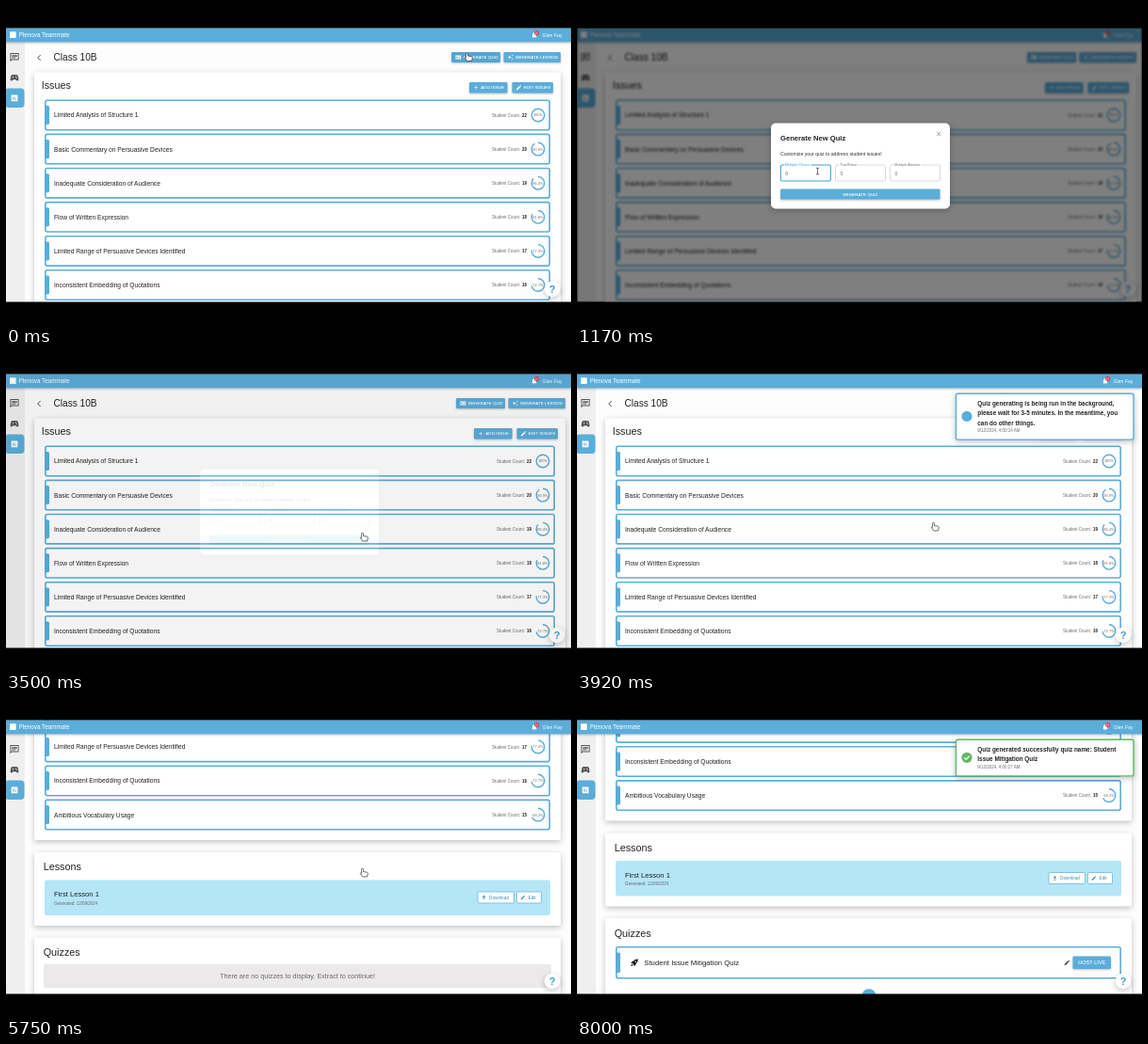
These frames come from a looping animation (600 by 338 pixels, 8.08 s). An HTML page:

```html
<!DOCTYPE html>
<html lang="en">
<head>
<meta charset="utf-8">
<title>Quiz generation walkthrough</title>
<style>
html, body { margin: 0; width: 100%; height: 100%; overflow: hidden; background: #000; }
svg { display: block; width: 100%; height: 100%; font-family: "Liberation Sans", Arial, sans-serif; }
text { white-space: pre; }
.card { filter: drop-shadow(0 2px 3px rgba(0, 0, 0, .24)); }
.lift { filter: drop-shadow(0 1px 1px rgba(0, 0, 0, .25)); }
#blurred { filter: blur(.8px); }
</style>
</head>
<body>
<svg id="stage" viewBox="0 0 600 338"></svg>
<script>
const BLUE = '#5badda', INK = '#222', GREY = '#6b6b6b', GREEN = '#62b866';
const LOOP = 8080, STEP = 1000 / 12;

const ICON = {
  pen: 'M3 17.25V21h3.75L17.81 9.94l-3.75-3.75zM20.71 7.04a1 1 0 0 0 0-1.41l-2.34-2.34a1 1 0 0 0-1.41 0l-1.83 1.83 3.75 3.75z',
  bell: 'M12 22c1.1 0 2-.9 2-2h-4c0 1.1.9 2 2 2zm6-6v-5c0-3-1.6-5.6-4.5-6.3V4a1.5 1.5 0 0 0-3 0v.7C7.6 5.4 6 8 6 11v5l-2 2v1h16v-1z',
  down: 'M5 20h14v-2H5zM19 9h-4V3H9v6H5l7 7z',
  plus: 'M19 13h-6v6h-2v-6H5v-2h6V5h2v6h6z',
  chat: 'M2 2h20v16H6l-4 4zM4 4v13l1-1h15V4zM6 12h8v2H6zM6 9h12v2H6zM6 6h12v2H6z',
  pad: 'M21.6 16.1l-1.1-7.7A4 4 0 0 0 16.5 5h-9a4 4 0 0 0-4 3.4l-1.1 7.7a2.55 2.55 0 0 0 4.3 2.1L9 16h6l2.3 2.2a2.55 2.55 0 0 0 4.3-2.1zM11 11H9v2H8v-2H6v-1h2V8h1v2h2zM14 8h2v2h-2zM16 11h2v2h-2z',
  chart: 'M3 3h18v18H3zM7 10v7h2v-7zM11 7v10h2V7zM15 13v4h2v-4z',
  card: 'M2 5h20v14H2zM5 9v6h5V9zM14 9v2h5V9zM14 13v2h5v-2z',
  spark: 'M9 5l2 5 5 2-5 2-2 5-2-5-5-2 5-2zM19 2l1 3 3 1-3 1-1 3-1-3-3-1 3-1zM19 14l1 3 3 1-3 1-1 3-1-3-3-1 3-1z',
  rocket: 'M22 2c-6 0-10 2-13 6L5 9l-3 4 5 1 3 3 1 5 4-3 1-4c4-3 6-7 6-13zM15 7a2 2 0 1 0 .1 0zM6 16c-3 0-3 3-4 6 3-1 6-1 6-4z'
};

const text = (x, y, size, str, fill = INK, extra = '') =>
  `<text x="${x}" y="${y}" font-size="${size}" fill="${fill}" ${extra}>${str}</text>`;
const rect = (x, y, w, h, fill, extra = '') =>
  `<rect x="${x}" y="${y}" width="${w}" height="${h}" fill="${fill}" ${extra}/>`;
const circle = (x, y, r, fill, extra = '') =>
  `<circle cx="${x}" cy="${y}" r="${r}" fill="${fill}" ${extra}/>`;
const line = (d, stroke, width, extra = '') =>
  `<path d="${d}" fill="none" stroke="${stroke}" stroke-width="${width}" ${extra}/>`;
const icon = (name, x, y, size, fill) =>
  `<path d="${ICON[name]}" fill="${fill}" fill-rule="evenodd" transform="translate(${x - size / 2} ${y - size / 2}) scale(${size / 24})"/>`;
const group = (id, body, extra = '') => `<g id="${id}" ${extra}>${body}</g>`;
const BOLD = 'font-weight="700"', MID = 'text-anchor="middle"', CAPS = 'letter-spacing=".13" stroke="#fff" stroke-width=".08"';

const button = (x, y, w, h, name, tx, label, fill = BLUE) =>
  rect(x, y, w, h, fill, 'rx="1.2" class="lift"') + icon(name, (x + tx) / 2 + 1, y + h / 2, 7, '#fff') +
  text(tx, y + h / 2 + 1.6, 4.4, label, '#fff', CAPS);

const frameRow = (y, h, wide) =>
  rect(41.8, y + .8, 535.4 + wide, h - 1.6, '#fff', `rx="2" stroke="${BLUE}" stroke-width="1.6"`) +
  `<path d="M41 ${y + 6.5}h3.5q1.5 0 1.5 1.5v${h - 16}q0 1.5-1.5 1.5H41z" fill="${BLUE}"/>`;

const issues = [
  ['Limited Analysis of Structure 1', 22], ['Basic Commentary on Persuasive Devices', 20],
  ['Inadequate Consideration of Audience', 19], ['Flow of Written Expression', 18],
  ['Limited Range of Persuasive Devices Identified', 17], ['Inconsistent Embedding of Quotations', 16],
  ['Ambitious Vocabulary Usage', 15]
];

function issueRow([label, count], i, wide) {
  const y = 116 + i * 36.1, x = 565 + wide, share = count / 22, len = 2 * Math.PI * 6.8;
  return frameRow(y - 16.5, 33, wide) + text(51, y + 2.4, 6.67, label) +
    text(x - 49, y + 1.6, 4.5, 'Student Count:', GREY) + text(x - 17, y + 1.6, 4.5, count, INK, BOLD) +
    circle(x, y, 6.8, 'none', `stroke="${BLUE}" stroke-width="1.4" stroke-dasharray="${len * share} ${len}" transform="rotate(-90 ${x} ${y})"`) +
    text(x, y + 1.4, 4, +(share * 100).toFixed(1) + '%', GREY, MID);
}

// The content column widens slightly while the dialog hides the scrollbar.
function page(wide, ids) {
  const card = (y, h) => rect(30, y, 559 + wide, h, '#fff', 'rx="2" class="card"');
  const outline = (x, w, name, tx, label) =>
    rect(x, 414.5, w, 12, '#fff', `rx="1.2" stroke="${BLUE}" stroke-width=".7"`) +
    icon(name, tx - 5.5, 420.5, 6, '#3f8fbd') + text(tx, 422.2, 4.7, label, '#3f8fbd');
  const empty = rect(40, 491.5, 539 + wide, 25, '#ebe9ea', 'rx="1.5"') +
    text(309.5, 506.6, 7.2, 'There are no quizzes to display. Extract to continue!', GREY, MID);
  const quiz = frameRow(493, 34.5, 0) + icon('rocket', 61, 510.3, 9, '#111') +
    text(71.3, 512.6, 7.75, 'Student Issue Mitigation Quiz') + icon('pen', 520.5, 510.3, 7, '#444') +
    rect(526.5, 503.5, 40.5, 13.5, BLUE, 'rx="1.2" class="lift"') +
    text(546.8, 512.2, 5.4, 'HOST LIVE', '#fff', MID + CAPS) +
    circle(310, 545.8, 7.5, BLUE, 'class="lift"') + icon('plus', 310, 545.8, 9, '#fff');
  return line('M36.7 52l-3 3 3 3', '#222', .8) + text(50.5, 58.3, 10.1, 'Class 10B') +
    button(473 + wide, 49, 52, 11, 'card', 485.7 + wide, 'GENERATE QUIZ', wide ? BLUE : '#55a5d1') +
    button(528.5 + wide, 49, 60.5, 11, 'spark', 541 + wide, 'GENERATE LESSON') +
    card(70.5, 289) + text(37.7, 88, 10.8, 'Issues') +
    button(492 + wide, 81, 40.5, 11.5, 'plus', 504.3 + wide, 'ADD ISSUE') +
    button(537.5 + wide, 81, 43.5, 11.5, 'pen', 549.7 + wide, 'EDIT ISSUES') +
    issues.map((row, i) => issueRow(row, i, wide)).join('') +
    card(372.5, 78) + text(39.7, 391.9, 10.8, 'Lessons') +
    rect(41, 402, 537 + wide, 37.5, '#b4e6f8', 'rx="2.5"') +
    text(51, 419.7, 7.65, 'First Lesson 1') + text(51, 428.2, 4.5, 'Generated: 12/09/2024', GREY) +
    outline(501, 38.5, 'down', 513, 'Download') + outline(542.5, 26, 'pen', 554.5, 'Edit') +
    (ids ? group('shortCard', card(463, 65)) + group('tallCard', card(463, 100)) : card(463, 65)) +
    text(39.7, 482.7, 10.8, 'Quizzes') +
    (ids ? group('empty', empty) + group('quiz', quiz) : empty);
}

const chrome = wide =>
  rect(0, 38, 20, 277, '#efefef') + icon('chat', 9, 54.7, 11, '#555') + icon('pad', 9, 76.3, 11, '#555') +
  rect(-1, 87.5, 20.5, 20.5, BLUE, 'rx="4"') + icon('chart', 9, 97.8, 9, '#fff') +
  rect(0, 23.5, 600, 14.8, BLUE, 'class="lift"') + rect(4, 27.3, 6.6, 6.6, '#fff') +
  text(13.7, 33, 6.3, 'Plenova Teammate', '#fff') +
  icon('bell', 561, 31, 8, '#fff') + circle(563.6, 28.4, 2.5, '#d9364f') +
  text(563.6, 29.5, 3, '16', '#fff', MID) + text(569.5, 32.6, 5.2, 'Glen Fay', '#fff') +
  circle(580 + wide, 301, 8.3, '#fff', 'class="card"') + text(580 + wide, 305, 11, '?', '#3f9bd0', MID + ' ' + BOLD);

const ground = rect(0, 23, 600, 292, '#fdfdfd');

const field = (x, label, i) => group('field' + i,
  rect(x, 169, 53, 17, '#fff', 'rx="1.6"') + rect(x + 4, 167, label.length * 1.78 + 1.5, 3.5, '#fff') +
  text(x + 4.7, 169.9, 3.85, label, GREY) + rect(x + 4.3, 173.8, 3.6, 7.2, '#2f74c0') +
  text(x + 4.9, 179.7, 5.2, '0', GREY) + line(`M${x + 8.3} 174.5v6`, '#222', .4));

const dialog = rect(206, 124.5, 190, 91, '#fff', 'rx="5" class="card"') +
  text(216, 142.7, 7.6, 'Generate New Quiz', INK, BOLD) + line('M382 133.8l4.4 4.4m0-4.4l-4.4 4.4', '#666', .6) +
  text(216, 158.6, 5.15, 'Customize your quiz to address student issues!', '#333') +
  field(216.3, 'Multiple Choice', 0) + field(274.5, 'True/False', 1) + field(332.5, 'Multiple Answer', 2) +
  rect(216, 194.5, 169.5, 11, BLUE, 'rx="1" class="lift"') +
  text(300.8, 201.6, 4.4, 'GENERATE QUIZ', '#fff', MID + ' ' + CAPS);

function toast(lines, stamp, color, mark) {
  const h = 18.2 + lines.length * 10.2, mid = 44 + h / 2;
  return rect(402.5, 44.3, 188.5, h, '#fff', `rx="2" stroke="${color}" stroke-width="1.4" class="card"`) +
    circle(414, mid, 5.6, color) + line(`M414 ${mid}${mark}`, '#fff', 1.2) +
    lines.map((s, i) => text(425.3, 57.2 + i * 10.2, 6.4, s, INK, BOLD)).join('') +
    text(425.3, 54.6 + lines.length * 10.2, 4.5, stamp, GREY);
}

const hand = '<path d="M-1 .8Q-1-.2 0-.2T1 .8V3l4 .8q1 .3.8 1.5L5 8.5H.2L-2.2 5q.2-1 1.2-.2z" fill="#fff" stroke="#222" stroke-width=".65"/>';
const beam = line('M-1.5-3.5Q0-3.5 0-2.5V2.5Q0 3.5-1.5 3.5M1.5-3.5Q0-3.5 0-2.5M0 2.5Q0 3.5 1.5 3.5', '#222', .65);

document.getElementById('stage').innerHTML =
  group('live', ground + group('scroller', page(0, true)) + chrome(0)) +
  group('blurred', ground + page(5) + chrome(5)) +
  group('modal', rect(0, 23, 600, 292, '#000', 'opacity=".5"') + group('dialog', dialog)) +
  group('info', toast(['Quiz generating is being run in the background,', 'please wait for 3-5 minutes. In the meantime, you', 'can do other things.'],
    '9/12/2024, 4:00:14 AM', BLUE, '-3v1.3m0 1v3.5')) +
  group('done', toast(['Quiz generated successfully quiz name: Student', 'Issue Mitigation Quiz'],
    '9/12/2024, 4:00:27 AM', GREEN, 'm-2.7 .2l1.9 1.9 3.6-3.8')) +
  group('cursor', group('hand', hand) + group('beam', beam)) +
  rect(0, 0, 600, 23.5, '#000') + rect(0, 314.5, 600, 23.5, '#000');

const $ = id => document.getElementById(id);
const show = (id, on) => $(id).style.display = on ? '' : 'none';
const move = (id, x, y) => $(id).setAttribute('transform', `translate(${x} ${y})`);
const ramp = (t, a, b) => Math.min(1, Math.max(0, (t - a) / (b - a)));

// Interpolates [time, ...values] keys.
function track(keys, t) {
  let i = 0;
  while (i < keys.length - 2 && t >= keys[i + 1][0]) i++;
  const [a, b] = [keys[i], keys[i + 1]], k = ramp(t, a[0], b[0]);
  return a.slice(1).map((v, j) => v + (b[j + 1] - v) * k);
}

const scrollKeys = [[5280, 0], [5333, 4], [5750, 208.5], [5916, 222], [6830, 222], [7000, 229]];
const pointer = [[0, 489.5, 50], [420, 489.5, 50], [960, 255.5, 175.5], [1660, 255.5, 175.5], [1980, 298.5, 182],
  [2840, 298.5, 182], [3160, 378.5, 198], [3420, 378.5, 198], [3660, 378.5, 181.5], [8080, 378.5, 181.5]];
const focusAt = [[1080, 1960], [1960, 2480], [2480, 3240]];
const typedAt = [1480, 2300, 2800];

function drawField(i, t) {
  const [box, , label, mark, value, caret] = $('field' + i).children;
  const focused = t >= focusAt[i][0] && t < focusAt[i][1], typed = t >= typedAt[i];
  const hovered = i === 0 ? t > 900 && t < 1800 : i === 1 && t > 1900 && t < 2950;
  const selected = focused && !typed && i > 0;
  box.setAttribute('stroke', focused ? '#459fd3' : hovered ? '#444' : '#bbb');
  box.setAttribute('stroke-width', focused ? 1.1 : .55);
  label.setAttribute('fill', focused ? '#459fd3' : GREY);
  mark.style.display = selected ? '' : 'none';
  value.textContent = typed ? 5 : 0;
  value.setAttribute('fill', selected ? '#fff' : GREY);
  caret.style.display = focused && typed && t % 1000 < 500 ? '' : 'none';
}

function slide(id, t, start, end) {
  const off = Math.max((1 - ramp(t, start, start + 250)) ** 2, ramp(t, end - 250, end) ** 2);
  show(id, t >= start && t < end);
  move(id, off * 205, 0);
}

function draw(now) {
  const t = Math.floor((now % LOOP + 4) / STEP) * STEP;
  const fade = ramp(t, 240, 460) * (1 - ramp(t, 3300, 3520));
  show('live', fade === 0);
  show('blurred', fade > 0);
  show('modal', fade > 0);
  $('modal').style.opacity = fade;
  $('blurred').style.filter = `blur(${.8 * fade}px)`;
  for (let i = 0; i < 3; i++) drawField(i, t);

  move('scroller', 0, -track(scrollKeys, t)[0]);
  const ready = t > 6800;
  for (const id of ['quiz', 'tallCard']) show(id, ready);
  for (const id of ['empty', 'shortCard']) show(id, !ready);
  slide('info', t, 3560, 5000);
  slide('done', t, 6800, 9000);

  const typing = t > 900 && t < 2950;
  show('cursor', !ready);
  show('beam', typing);
  show('hand', !typing);
  move('cursor', ...track(pointer, t));
  requestAnimationFrame(draw);
}
draw(performance.now());
</script>
</body>
</html>
```
